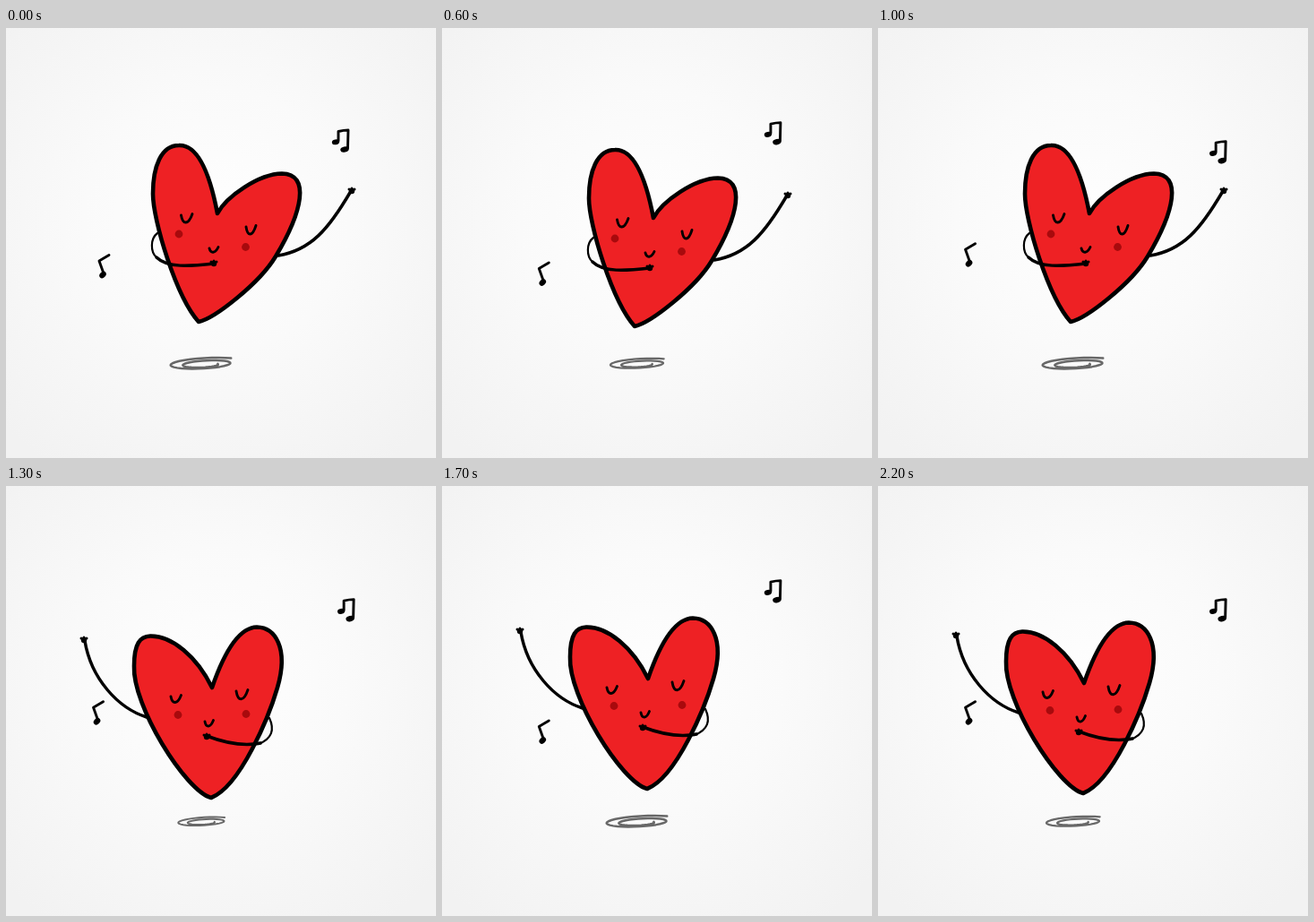
Recreate the animation shown at these times as an HTML page. Size 480 by 480 pixels, loop 2300 ms.

```html
<!DOCTYPE html>
<html lang="en">
<head>
<meta charset="utf-8">
<title>Dancing heart</title>
<style>
  html, body { margin: 0; width: 100%; height: 100%; overflow: hidden; background: #f4f4f4; }
  svg { display: block; width: 100vw; height: 100vh; }
  path { fill: none; stroke: #000; stroke-linecap: round; stroke-linejoin: round; }
  .heart { fill: #ee2124; stroke-width: 4.6; }
  .limb { stroke-width: 3.5; }
  .elbow { stroke-width: 2.2; }
  .face, .note path { stroke-width: 2.9; }
  .cheek { fill: #a80a0d; }
  #shadow path { stroke: #686868; stroke-width: 2.5; }
</style>
</head>
<body>
<svg viewBox="0 0 480 480">
  <defs>
    <radialGradient id="paper" gradientUnits="userSpaceOnUse" cx="235" cy="215" r="330">
      <stop offset="0" stop-color="#fefefe"/>
      <stop offset=".45" stop-color="#fafafa"/>
      <stop offset="1" stop-color="#f2f2f2"/>
    </radialGradient>
  </defs>
  <rect width="480" height="480" fill="url(#paper)"/>
  <g id="shadow"></g>
  <g id="leanLeft"></g>
  <g id="leanRight"></g>
  <g id="single" class="note">
    <path d="M109 274L104 260Q109 257 115 253.5"/>
    <ellipse cx="108" cy="275.5" rx="4.2" ry="3.2" transform="rotate(-45 108 275.5)"/>
  </g>
  <g id="pair" class="note">
    <path d="M371 126L371 115.5Q377 114 382 114L381.5 134"/>
    <ellipse cx="368" cy="127.3" rx="4.2" ry="2.9" transform="rotate(-12 368 127.3)"/>
    <ellipse cx="378" cy="135.5" rx="4.8" ry="3.1" transform="rotate(-12 378 135.5)"/>
  </g>
</svg>
<script>
const FRAME_MS = 100;
const FRAMES = 23;
const TURN_FRAME = 11;

const el = id => document.getElementById(id);
const stroke = (cls, d) => `<path class="${cls}" d="${d}"/>`;
const dot = (cls, x, y, r) => `<circle class="${cls}" cx="${x}" cy="${y}" r="${r}"/>`;
const cup = (x, y, w, h) => stroke("face", `M${x} ${y}c${w * .15} ${h} ${w * .65} ${h} ${w} -1.5`);

// A fist with three stubby knuckles.
const hand = (x, y) => dot("", x, y, 3.2) +
  [-1, 0, 1].map(k => dot("", x + 3 * k, y - 2 - (k === 0), 1.5)).join("");

const dancer = ({ heart, elbow, hug, raised, hands, cups, cheeks }) =>
  stroke("elbow", elbow) + stroke("limb", raised) + hand(...hands[0]) +
  stroke("heart", heart) +
  cups.map(c => cup(...c)).join("") +
  cheeks.map(([x, y]) => dot("cheek", x, y, 4.4)).join("") +
  stroke("limb", hug) + hand(...hands[1]);

el("leanLeft").innerHTML = dancer({
  heart: "M236 207C246 188 282 163 308 162.5C340 163 331 205 301 255C283 285 233 324 215 328" +
    "C190 300 164 215 164 185C164 155 173 131 193 131C215 130 228 165 236 207Z",
  elbow: "M169 229C161 235 161 250 168 256",
  hug: "M168 256C180 268 205 266 232 263",
  raised: "M304 254C340 248 360 225 385 182",
  hands: [[386, 182], [232, 263]],
  cups: [[195.5, 209, 12.5, 11], [268, 222, 11, 11], [227, 246, 10, 6]],
  cheeks: [[193, 230], [267.5, 244.5]]
});

el("leanRight").innerHTML = dancer({
  heart: "M230 215C242 180 258 148 280 147.5C300 148 316 170 303 215C294 246 262 325 229 338" +
    "C200 330 141 235 143 191C143 165 150 158 161 157.5C185 157 213 180 230 215Z",
  elbow: "M294 249C300 262 297 272 282 278",
  hug: "M284 277C265 281 245 277 224 269",
  raised: "M157 248C125 238 95 205 88 163",
  hands: [[87, 162], [224, 270]],
  cups: [[184, 225, 11.5, 9], [257, 219, 13, 12], [222, 253, 9.5, 7]],
  cheeks: [[192, 245.5], [268, 244.5]]
});

// A flat spiral around the middle of the shadow.
function scribble(turns, steps = 60) {
  const points = Array.from({ length: steps + 1 }, (_, i) => {
    const t = i / steps, angle = -.75 - t * turns * 2 * Math.PI, r = 1 - .62 * t;
    const x = 42 * r * Math.cos(angle);
    return `${x} ${6.4 * r * Math.sin(angle) - .05 * x + 1.5 * t}`;
  });
  return "M" + points.join("L");
}
el("shadow").innerHTML = stroke("", scribble(1.9));

const move = (id, transform) => el(id).setAttribute("transform", transform);
const show = (id, visible) => el(id).setAttribute("visibility", visible ? "visible" : "hidden");

function draw(time) {
  const frame = Math.floor(time / FRAME_MS) % FRAMES;
  const turned = frame >= TURN_FRAME;

  // The second half bounces a little slower than the first.
  const beat = turned ? (frame - TURN_FRAME) % 6 : frame % 5;
  const fall = Math.min(beat, 6 - beat);
  const drop = `translate(0 ${Math.min(5 * fall, 10.7)})`;
  show("leanLeft", !turned);
  show("leanRight", turned);
  move("leanLeft", drop);
  move("leanRight", drop);
  move("shadow", `translate(220.5 374.5) scale(${1 - Math.min(fall, 2.6) * .116})`);

  // Notes sway on every second frame and reverse with the lean.
  const sway = Math.round(Math.sin(Math.floor((frame + 1) / 2) * Math.PI / 2)) * (turned ? -1 : 1);
  const reach = sway > 0 ? 1.5 * sway : sway;
  move("pair", `translate(${4.1 * reach} ${8.4 * reach})`);
  move("single", `translate(${-4.3 * reach} ${-8.5 * reach})`);
}

const began = performance.now();
function tick() {
  draw(performance.now() - began);
  requestAnimationFrame(tick);
}
tick();
</script>
</body>
</html>
```
